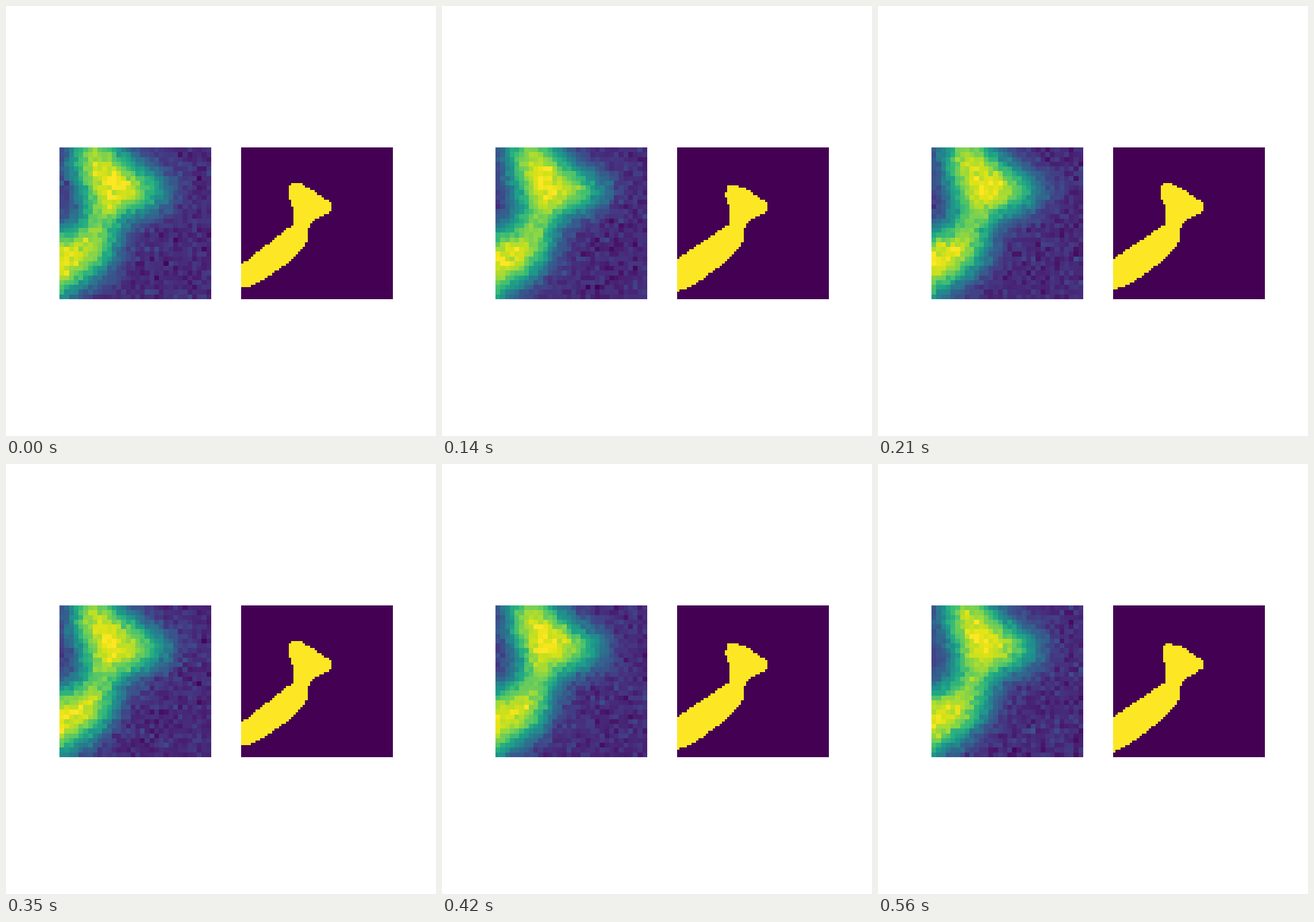
A matplotlib script for the animation above (0.63 s loop, 748 px wide and 748 px high).

```python
import numpy as np
import matplotlib.pyplot as plt
from matplotlib.animation import FuncAnimation
from matplotlib.path import Path

STAGE, FRAMES, STEP = 748, 9, 70
SIDE, SHOWN = 263.5, 264
LEFT_X, RIGHT_X, TOP_Y = 93, 409, 246
CELLS, FINE, PAD = 32, 64, 8
BLUR, DARK, BRIGHT, NOISE = 3.0, 0.12, 0.9, 0.037


def inside(points, xs, ys):
    """Boolean grid of the centres that lie in a polygon."""
    gx, gy = np.meshgrid(xs, ys)
    hits = Path(points).contains_points(np.column_stack([gx.ravel(), gy.ravel()]))
    return hits.reshape(gx.shape)


def glow():
    """Mean brightness: a wedge joined to a slanted bar, out of focus."""
    shape = [(3, -4), (8, -4), (15, 3.7), (24.5, 9), (18, 12.5),
             (10.8, 15.5), (11.8, 20), (10, 24.5), (4.5, 28.3),
             (-8, 37), (-8, 21), (0, 18.3), (6.3, 16.5), (6, 12), (3.2, 4)]
    wide = np.arange(-PAD, CELLS + PAD) + 0.5
    gap = wide[PAD:-PAD, None] - wide[None, :]
    w = np.exp(-0.5 * (gap / BLUR) ** 2)
    w /= w.sum(axis=1, keepdims=True)
    return DARK + BRIGHT * w @ inside(shape, wide, wide) @ w.T


def outline(i):
    """Corners of the yellow shape; one sway moves head and tail together."""
    s = np.interp(i, [0, 1, 3, 5, 7, 8], [0, 0.75, 0.25, 0, 1, 0.75])
    top, left, tip, low = 307 + 7 * s, 492 + 5 * s, 565 + 3.4 * s, 489 + 16 * s
    up = 440 + 10 * max(0, 1 - 4 * s)
    return [
        (left, top + 6), (left + 5, top), (512, top + 1), (530, 318.5),
        (558, 336), (tip, 341 + 3 * s), (tip, 357 - 3 * s), (541, 370),
        (528.5, 381), (525, 388), (525, 408), (519, 419), (502, 436),
        (484, 451.5 + 2 * s), (447, 476.5 + 5 * s), (430, 486 + 8 * s),
        (409, low), (409, up), (502, 378), (502, 358), (492 + 3 * s, 331),
    ]


def enlarge(data):
    """Turn cells into hard-edged blocks of screen pixels."""
    n = len(data)
    pick = ((np.arange(SHOWN) + 0.25) * n / SIDE).astype(int)
    return data[np.ix_(pick, pick)]


FIELD = glow()
CENTRES = (np.arange(FINE) + 0.5) * SIDE / FINE


def noisy(i):
    rng = np.random.default_rng(40 + i)
    grain = rng.normal(0, NOISE, FIELD.shape)
    return enlarge(np.clip(FIELD + grain, 0, 1))


def mask(i):
    shape = inside(outline(i), RIGHT_X + 0.6 + CENTRES, TOP_Y + CENTRES)
    return enlarge(shape.astype(float))


fig = plt.figure(figsize=(STAGE / 100, STAGE / 100), dpi=100, facecolor="white")


def panel(data, x):
    return fig.figimage(data, xo=x, yo=STAGE - TOP_Y - SHOWN, origin="upper",
                        cmap="viridis", vmin=0, vmax=1)


photo = panel(noisy(0), LEFT_X)
label = panel(mask(0), RIGHT_X)


def update(i):
    photo.set_data(noisy(i))
    label.set_data(mask(i))
    return photo, label


anim = FuncAnimation(fig, update, frames=FRAMES, interval=STEP,
                     repeat=True, repeat_delay=0)
plt.show()
```
